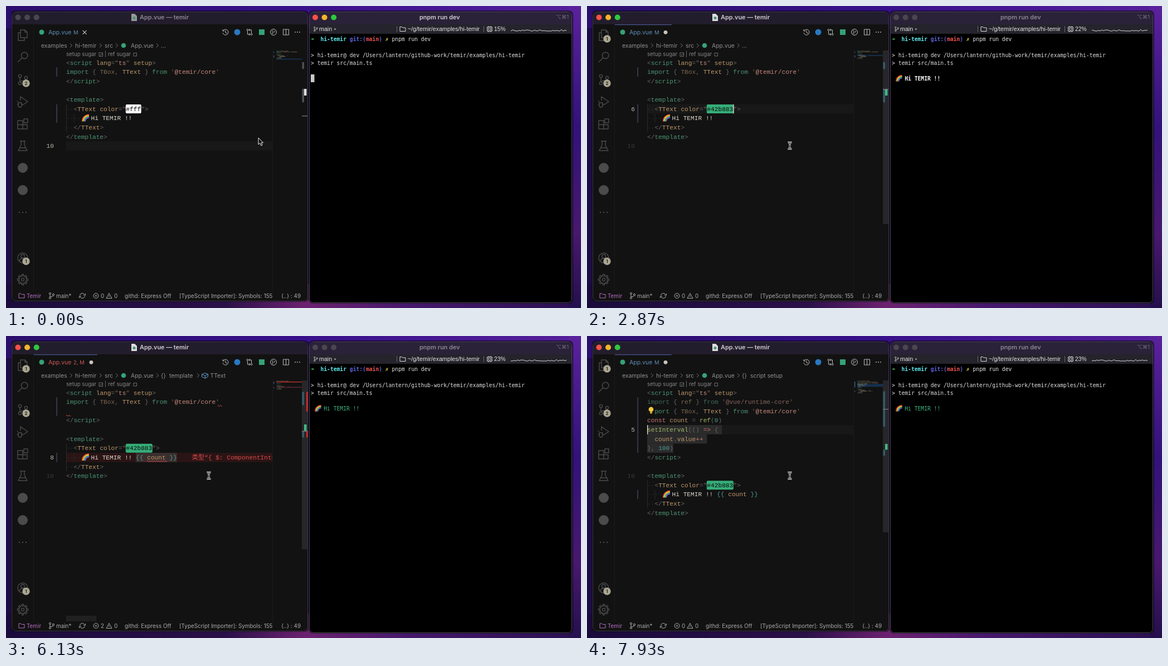
An HTML page for the animation above (8000 ms loop, 1032 px wide and 543 px high).

```html
<!DOCTYPE html>
<html lang="en">
<head>
<meta charset="utf-8">
<title>Editor and terminal</title>
<style>
html, body { margin: 0; width: 100%; height: 100%; overflow: hidden; background: #1d0d45; }
svg { display: block; width: 1032px; height: 543px; }
text { white-space: pre; }
.ui { font-family: Inter, sans-serif; }
.bar { font-family: "Liberation Sans", sans-serif; }
.code { font-family: "Liberation Mono", "Noto Sans CJK SC", "Noto Sans CJK", monospace; }
.term { font-family: "DejaVu Sans Mono", monospace; }
</style>
</head>
<body>
<svg viewBox="0 0 1032 543">
  <defs>
    <linearGradient id="top"><stop offset="0" stop-color="#2b0f6c"/><stop offset=".5" stop-color="#37108a"/><stop offset="1" stop-color="#55209a"/></linearGradient>
    <linearGradient id="low"><stop offset="0" stop-color="#1a0b3c"/><stop offset=".38" stop-color="#2a1048"/><stop offset=".52" stop-color="#6c2170"/><stop offset=".7" stop-color="#45186b"/><stop offset="1" stop-color="#291050"/></linearGradient>
    <linearGradient id="side" x2="0" y2="1"><stop offset="0" stop-color="#5a229c"/><stop offset=".4" stop-color="#32127a"/><stop offset=".75" stop-color="#48186f"/><stop offset="1" stop-color="#24104c"/></linearGradient>
    <clipPath id="edit"><rect x="50" y="79" width="429" height="434"/></clipPath>
  </defs>
  <g id="still"></g>
  <g id="live"></g>
</svg>
<script>
const CW = 6.709, LH = 16.62, X = 108, EMOJI = 2.64;
const LOOP = 8000;
const still = document.getElementById('still'), live = document.getElementById('live');
const INK = {
  p: '#666666', g: '#4d9375', y: '#bd976a', s: '#c98a7d', q: '#7d5d55', w: '#dbd7ca',
  u: '#7a6650', f: '#a1b567', r: '#cb7676', n: '#4c9a91', d: '#303030', k: '#0a0a0a', i: '#3f6b59', j: '#85635c'
};
const esc = s => s.replace(/&/g, '&amp;').replace(/</g, '&lt;');
const text = (x, y, s, fill, size, font = 'ui', more = '') =>
  `<text x="${x}" y="${y}" fill="${fill}" font-size="${size}" class="${font}" ${more}>${esc(s)}</text>`;
const rect = (x, y, w, h, fill, r = 0, more = '') =>
  `<rect x="${x}" y="${y}" width="${w}" height="${h}" rx="${r}" fill="${fill}" ${more}/>`;
const dot = (x, y, r, fill, more = '') => `<circle cx="${x}" cy="${y}" r="${r}" fill="${fill}" ${more}/>`;
const ring = (x, y, r, stroke, w = 1) => dot(x, y, r, 'none', `stroke="${stroke}" stroke-width="${w}"`);
const path = (d, stroke, w = 1, fill = 'none') =>
  `<path d="${d}" fill="${fill}" stroke="${stroke}" stroke-width="${w}" stroke-linejoin="round"/>`;
const at = (x, y, s) => `<g transform="translate(${x} ${y})">${s}</g>`;
const mid = n => 102 + (n - 1) * LH;

const rainbow = (x, y, size) => at(x, y, ['#e8453c', '#f59331', '#f7d83f', '#5fc25a', '#3f9be8', '#8a5bd0']
  .map((c, i) => {
    const r = size * (.95 - i * .09);
    return path(`M${size - r} ${size}A${r} ${r} 0 0 1 ${size} ${size - r}`, c, size * .1);
  }).join(''));
const badge = (y, n) => dot(36, y, 6.7, '#aaa692') + text(36, y + 3, n, '#15150f', 8, 'ui', 'text-anchor="middle" font-weight="600"');
const branch = (x, y, c, k = 1) => at(x, y, `<g transform="scale(${k})">` + ring(-3, -4, 1.6, c) + ring(-3, 4, 1.6, c) +
  ring(3, -2, 1.6, c) + path('M-3 -2.4V2.4M3 -.4C3 2 -3 1 -3 2.4', c) + '</g>');
const folder = (x, y, c) => path(`M${x} ${y}h3.5l1.5 1.5h5v6.5h-10z`, c);
const chevron = x => path(`M${x} 67.5l3.5 3.5l-3.5 3.5`, '#777');

function activityBar() {
  const c = '#4b4b4b', big = (x, y, d) => at(x, y, path(d, c, 1.4));
  const teeth = Array.from({length: 8}, (_, i) => `<path d="M-2 -6.5L-1.4 -9.5H1.4L2 -6.5" transform="rotate(${i * 45})" fill="none" stroke="${c}" stroke-width="1.3"/>`).join('');
  return big(30, 52, 'M-4 -9H4L8 -5V5H-4ZM-4 -4H-8V10H3V5M4 -9V-5H8') +
    big(30, 92, 'M9 -3A5.8 5.8 0 1 1 -2.6 -3A5.8 5.8 0 1 1 9 -3M-1 1L-9 9') +
    at(30, 132, ring(-5, -6, 2.6, c, 1.4) + ring(-5, 7, 2.6, c, 1.4) + ring(6, -3, 2.6, c, 1.4) + path('M-5 -3.4V4.4M6 -.4C6 4 -5 1 -5 4.4', c, 1.4)) +
    big(30, 172, 'M-4 -2V-9L9 0L0 6M-8 2H-2V7A3 3 0 0 1 -8 7ZM-8 0L-10 -1M-8 5H-10M-2 5H0') +
    big(30, 212, 'M-9 -6H0V9H-9ZM-9 1.5H8V9H0M2 -9H9V-2H2Z') +
    big(30, 252, 'M-5 -9H5M-3 -9V-2L-8 8H8L3 -2V-9M-5.5 3H5.5') +
    dot(30, 291, 9, c) + dot(30, 331, 9, c) +
    [-6, 0, 6].map(d => dot(30 + d, 371, 1.2, c)).join('') +
    at(30, 453, ring(0, 0, 9, c, 1.4) + ring(0, -3, 3.3, c, 1.4) + path('M-6 6C-5 -1 5 -1 6 6', c, 1.4)) +
    at(30, 492, ring(0, 0, 6.8, c, 1.3) + ring(0, 0, 2.5, c, 1.3) + teeth) +
    badge(139, '2') + badge(459, '1');
}

function toolbar() {
  const c = '#bbb';
  return at(394, 47, path('M-4 -3A5 5 0 1 1 -5 1M-5 -5V-2H-2M0 -3V1L3 2', c)) +
    dot(415, 47, 5.5, '#2878c0') +
    at(437, 47, ring(-3.5, -4, 1.5, c) + ring(3.5, 4, 1.5, c) + path('M-3.5 -2V4H1M-1 2L1 4L-1 6M3.5 2V-4H-1M1 -6L-1 -4L1 -2', c)) +
    rect(454, 42, 10, 10, '#35a276') +
    ring(480, 47, 5.5, c) + branch(480, 47, c, .6) +
    path('M497.5 42h10v10h-10zM502.5 42v10', c) +
    [-4, 0, 4].map(d => dot(523 + d, 47, .9, c)).join('');
}

function backdrop() {
  return rect(0, 0, 1032, 543, '#1d0d45') + rect(0, 0, 1032, 40, 'url(#top)') +
    rect(0, 500, 1032, 43, 'url(#low)') + rect(1010, 0, 22, 543, 'url(#side)') +
    rect(9, 8, 534, 524, '#000', 7, 'opacity=".55"') +
    rect(10.5, 10.5, 531, 520, '#121212', 7, 'stroke="#3d3846"') +
    path('M11 33V17Q11 11 17 11H535Q541 11 541 17V33Z', 'none', 0, '#221d2c') +
    path('M49.5 33V513M50 79.5', '#1b1b1b') +
    activityBar() + toolbar() + dot(64, 47, 4.5, '#35a276') +
    text(63, 75, 'examples', '#8f8f8f', 10.4) + chevron(115) + text(124, 75, 'hi-temir', '#8f8f8f', 10.4) + chevron(168) +
    text(177, 75, 'src', '#8f8f8f', 10.4) + chevron(197) + dot(211, 71, 4.3, '#35a276') + text(224, 75, 'App.vue', '#8f8f8f', 10.4) + chevron(270) +
    text(108, 90, 'setup sugar', '#858585', 9.7) + path('M167 84h6.5v6.5h-6.5zM168.5 87l1.7 1.8l2.6-3.5', '#858585', .8) +
    text(177, 90, '| ref sugar', '#858585', 9.7) + path('M229 84.5h5.5v5.5h-5.5z', '#858585', .8) +
    folder(23, 517, '#b56cc4') + text(37, 525, 'Temir', '#b56cc4', 9.9) +
    branch(82, 521, '#aaa') + text(90, 525, 'main*', '#aaa', 9.9) +
    at(137, 521, path('M-4.5 -.5A4.5 4.5 0 0 1 4 -2M4.5 .5A4.5 4.5 0 0 1 -4 2M2 -1H5.5V-4M-2 1H-5.5V4', '#aaa')) +
    ring(161.5, 521, 4.5, '#aaa') + path('M159.7 519.2l3.6 3.6m0-3.6l-3.6 3.6M185 516.5l5 9h-10zM185 520v3', '#aaa') +
    text(194, 525, '0', '#aaa', 9.9) + text(213, 525, 'githd: Express Off', '#aaa', 9.9) +
    text(311, 525, '[TypeScript Importer]: Symbols: 155', '#aaa', 9.9) + text(494, 525, '{..} : 49', '#aaa', 9.9) +
    rect(543, 8, 475, 527, '#000', 8, 'opacity=".55"') +
    rect(544.5, 10.5, 471, 523, '#000', 7, 'stroke="#4a4653"') +
    path('M545 33V17Q545 11 551 11H1009Q1015 11 1015 17V33Z', 'none', 0, '#2a2238') +
    rect(545, 33, 470, 17, '#25232b') + path('M701.5 36V47M857.5 36V47', '#68656f') +
    text(987, 22.5, '⌥⌘1', '#756d80', 9.5) + branch(556, 41.5, '#ddd', .75) +
    text(562, 45.3, 'main', '#e4e4e4', 10.7, 'bar') + dot(590.5, 41.5, 1.5, '#999') +
    folder(707, 37.5, '#ddd') + text(721, 45.3, '~/g/temir/examples/hi-temir', '#e4e4e4', 10.7, 'bar') +
    path('M864 37.5h8v8h-8zM866 39.5h4v4h-4zM866 36v1.5m4-1.5v1.5m-4 8v1.5m4-1.5v1.5M862.5 39.5h1.5m-1.5 4h1.5m8-4h1.5m-1.5 4h1.5', '#ddd', .9) +
    [[0, '➜', '#3fd85c'], [3, 'hi-temir', '#5fe8ec'], [12, 'git:(', '#5b63dc'], [17, 'main', '#ef5350'], [21, ')', '#5b63dc'], [23, '✗', '#f1e84a']]
      .map(([c, s, ink]) => text(547 + c * 5.82, 63.3, s, ink, 9.67, 'term', 'font-weight="700"')).join('') +
    text(692.5, 63.3, 'pnpm run dev', '#e6e6e6', 9.67, 'term') +
    text(547, 91.5, '> hi-temir@ dev /Users/lantern/github-work/temir/examples/hi-temir', '#e0e0e0', 9.67, 'term') +
    text(547, 105.7, '> temir src/main.ts', '#e0e0e0', 9.67, 'term');
}

// Source lines: tokens split by "~", the first letter picks the ink.
const IMPORT = 'gimport~p { ~uTBox~p, ~yTText~p } ~gfrom~p ~q\'~s@temir/core~q\'';
const IMPORT_REF = 'iimport~p { ~uref~p } ~ifrom~p ~q\'~j@vue/runtime-core~q\'';
const CONST = 'rconst~p ~ycount~p = ~fref~p(~n0~p)';
const TIMER = ['fsetInterval~p(() ~r=>~p {', 'd··~ycount~p.~yvalue~r++', 'p}, ~n100~p)'];
const COUNT = 'p ~n{{~p ~ycount~p ~n}}';

const tokens = s => s ? s.split('~') : [];
const size = s => tokens(s).reduce((n, k) => n + (k[0] == 'e' ? EMOJI : k.length - 1), 0);
const cut = (s, n) => tokens(s).map(k => {
  const part = k.slice(0, 1 + Math.max(0, n));
  n -= k.length - 1;
  return part;
}).filter(k => k.length > 1).join('~');
const typed = (t, from, step) => t < from ? 0 : Math.floor((t - from) / step) + 1;
const latest = (t, list) => list.filter(k => k[0] <= t).pop();

function document_(t) {
  const hex = t < 2100 ? 'fff'.slice(0, 3 - Math.min(3, typed(t, 1800, 100))) : '42b883'.slice(0, typed(t, 2100, 120));
  const valid = hex.length == 3 || hex.length == 6;
  const rows = [['p<~gscript~p ~ylang~p=~q"~sts~q"~p ~ysetup~p>', 0]];
  let caret;
  if (t >= 6652) rows.push([IMPORT_REF, 1]);
  rows.push([IMPORT, 1]);
  if (t >= 6300) rows.push([cut(CONST, typed(t, 6300, 22)), 1]);
  if (t >= 6900) {
    let left = typed(t, 6900, 12);
    for (const s of TIMER) {
      if (left < 0) break;
      rows.push([cut(s, left), 1]);
      caret = [rows.length, Math.min(left, size(s))];
      left -= size(s) + 1;
    }
  } else if (t >= 4750) rows.push(['', 1]);
  rows.push(['p</~gscript~p>', 0], ['', 0], ['p<~gtemplate~p>', 0]);
  const tag = rows.push([`d··~p<~yTText~p ~ycolor~p=~q"~${valid ? 'k' : 's'}#${hex}~q"~p>`, t < 3200]);
  const greet = cut(COUNT, typed(t, 5000, 50));
  rows.push(['d····~e~wHi TEMIR !!' + (greet && '~' + greet), 1], ['d··~p</~yTText~p>', 0], ['p</~gtemplate~p>', 0], ['', 0]);

  let last = latest(t, [[730], [1200], [1300], [1400], [1500], [1650], [1800], [2700], [4500], [4750], [5550], [6300], [6718], [6850], [7430], [7600], [7700], [7800]]) || [0];
  if (t < 1200) caret = [10, 0];
  else if (t < 1650) caret = [10 - typed(Math.min(t, 1500), 1200, 100), 0];
  else if (t < 4500) caret = [6, 17 + hex.length];
  else if (t < 4750) caret = [6 - Math.min(4, typed(t, 4500, 50)), 0];
  else if (t < 5000) caret = [3 + Math.min(5, typed(t, 4800, 40)), 0];
  else if (t < 6150) caret = [8, 4 + EMOJI + 11 + Math.min(12, typed(t, 5000, 50))];
  else if (t < 6300) caret = [8 - Math.min(5, typed(t, 6150, 30)), 0];
  else if (t < 6850) caret = [t < 6652 ? 3 : 4, Math.min(20, typed(t, 6300, 22))];
  else if (t < 6900) caret = [5, 0];
  else if (t >= 7600) caret = [7 - Math.min(2, typed(t, 7700, 100)), 0];
  return {rows, caret, tag, hex, valid, blink: t >= 730 && (t - last[0]) % 1000 < 500};
}

const squiggle = (x, y, w) => {
  let d = `M${x} ${y}`;
  for (let i = 0; i < w; i += 4) d += 'q1 -2.6 2 0t2 0';
  return path(d, '#d84a4a', .9);
};

function editor(t) {
  const {rows, caret, tag, hex, valid, blink} = document_(t);
  const [row, col] = caret, focus = t >= 730;
  const error = t >= 5700 && t < 7000, moved = t >= 6300;
  const errorRow = moved ? tag : tag + 1;
  const step = 420 / (rows.length + 25), mark = n => 89 + (n - 1) * step;
  const swatch = '#' + hex;
  const tint = '#' + (hex.length == 6 ? '35ad78' : 'ffffff');
  const endX = n => X + (size(rows[n - 1][0]) + 4) * CW;
  const top = n => mid(n) - LH / 2;
  let s = rect(X, top(row), 371, LH, '#181818'), map = '', ruler = '';

  if (error) s += rect(X, top(errorRow), 371, LH, '#2b1415');
  if (t >= 7600) for (let n = row; n < 8; n++) s += rect(X, top(n), (size(rows[n - 1][0]) + (n < 7)) * CW, LH, '#2b2b2b');
  if (error && !moved) s += rect(X + (size(rows[7][0]) - 11) * CW, top(8), 11 * CW, LH, '#3a2e2e');
  if (valid) s += rect(X + 16 * CW - .5, top(tag) + .3, (hex.length + 1) * CW + 1, LH - .6, tint, 2);

  map += rect(485, 79 + row * 1.64 - .8, 46, 1.8, '#16304f');
  if (t >= 7600) map += rect(485, 79 + row * 1.64 - .8, 46, (8 - row) * 1.64, '#16304f');
  rows.forEach(([line, changed], i) => {
    const n = i + 1;
    let c = 0;
    for (const k of tokens(line)) {
      if (k[0] == 'e') { s += rainbow(X + c * CW + 1, top(n) + 1, 13); c += EMOJI; continue; }
      const str = k.slice(1);
      s += text(X + c * CW, mid(n) + 3.6, str, INK[k[0]], 11.18, 'code');
      if (k[0] != 'd' && str.trim()) map += rect(485 + c * .93, 79 + n * 1.64, str.length * .93, .8, INK[k[0]], 0, 'opacity=".65"');
      c += str.length;
    }
    if (changed) {
      s += rect(90.5, top(n), 1.3, LH, '#4c4866');
      map += rect(480, 79 + n * 1.64, 1.3, 1.64, '#4568a8');
      ruler += rect(531.5, mark(n), 3.5, step + .2, focus ? '#365b68' : '#4c5255');
    }
  });
  s += rect(X, top(tag), 1, LH * 3, '#292929') + rect(X + 2 * CW, top(tag + 1), 1, LH, '#292929');
  for (const n of new Set([10, row])) if (n <= rows.length)
    s += text(86, mid(n) + 3.6, String(n), n == row ? '#b8b5aa' : '#393939', 11.18, 'code', 'text-anchor="end"');

  if (t >= 3700 && t < 4500) s += text(endX(6), mid(6) + 3.6, 'nightowlqz [19 hours ago]', '#777', 11.18, 'code', 'font-style="italic"');
  if (error) {
    s += text(endX(errorRow), mid(errorRow) + 3.6, '类型“{ $: ComponentInternalInstance', '#dd4b4b', 11.18, 'code');
    const blank = tag - 4;
    s += squiggle(X, mid(blank) + 8, 6);
    if (moved) s += squiggle(X + 23 * CW, mid(tag) + 7, 12);
    else s += squiggle(X + 40.5 * CW, mid(2) + 7, 6) + squiggle(X + (size(rows[7][0]) - 8) * CW, mid(8) + 7, 33);
    ruler += rect(539, mark(blank - 1), 3, step * 3, '#c52d2d') + rect(539, mark(errorRow), 3, step, '#c52d2d');
    map += rect(485, 79 + (blank - 1) * 1.64 - .4, 46, 1.5, '#b82b2b') + rect(485, 79 + errorRow * 1.64 - .4, 46, 1.3, '#632020');
  }
  if (t >= 6718 && t < 6850) {
    s += [17, 19].map(c => rect(X + c * CW, top(row) + 1, CW, LH - 2, 'none', 0, 'stroke="#777" stroke-width=".8"')).join('');
    ruler += rect(535, mark(row), 6, step, '#999');
  }
  if (blink) s += rect(X + col * CW, top(row), 1.3, LH, '#e8e5da');
  if (t >= 7850) s += rect(X + 1.6, top(3), 12, LH, '#121212') + dot(115, 132, 4.4, '#f5c542') + rect(113, 135.5, 4, 4, '#d9a52e', 1);

  const wide = t >= 3700 && t < 4500 ? 261 : error ? 54 : 0;
  const slider = focus ? rect(531, 80, 10, 26 * step, '#272729') : '';
  if (valid) ruler += rect(535, mark(tag), 4.5, step, hex.length == 6 ? swatch : focus ? '#fff' : '#ddd');
  return `<g clip-path="url(#edit)">${s}${wide ? rect(X, 503, wide, 10, '#202020') : ''}</g>` +
    path('M478.5 79V513M531 79.5', '#1b1b1b') + map + slider + ruler + rect(531, mark(row), 10, 1.3, '#777');
}

function chrome(t) {
  const focus = t >= 730, error = t >= 5700 && t < 7000;
  const dirty = t >= 1800 && t < 3100 || t >= 4750;
  const lights = (x, on) => ['#ff4f4a', '#f6b42c', '#2fc840'].map((c, i) => dot(x + i * 16.6, 20.5, 5, on ? c : '#4a4650')).join('');
  const title = (x, s, on) => text(x, 24.3, s, on ? '#d0ccd4' : '#8d8695', 10.9, 'ui', 'font-weight="600"');
  const closeX = error ? 153 : 141, ink = error ? '#cf5757' : '#5f8fb8';
  let s = lights(21.5, focus) + title(240, 'App.vue — temir', focus) + lights(555, !focus) + title(742, 'pnpm run dev', !focus) +
    path('M225 14h6l4 4v9h-10z', 'none', 0, focus ? '#ddd' : '#999') + dot(230, 21.5, 2.6, '#4c9478') +
    text(76, 51, 'App.vue', ink, 10.5) + text(121, 51, error ? '2, M' : 'M', ink, 9.5) + text(170, 525, error ? '2' : '0', '#aaa', 9.9);
  s += dirty ? dot(closeX, 47.3, 3.4, '#c8c5bb') + rect(50, 33, closeX + 11 - 50, 1.2, '#4d5590') + badge(59, '1')
    : path(`M${closeX - 3.5} 43.8l7 7m0-7l-7 7`, '#ccc', 1.1);

  const inScript = t >= 6600;
  if (t < 3300) s += text(278, 75, '...', '#8f8f8f', 10.4);
  else {
    s += text(278, 75, '{}', '#8f8f8f', 10.4) + text(293, 75, inScript ? 'script setup' : 'template', '#8f8f8f', 10.4);
    if (!inScript) s += chevron(343) + path('M351.5 69l5-2.5l6 2v4.5l-5 3l-6-2.5zM351.5 69l6 2.5l5-3M357.5 71.5v4.5', '#5a9fd0') + text(366.5, 75, 'TText', '#8f8f8f', 10.4);
  }
  return s;
}

function terminal(t) {
  const cpu = latest(t, [[0, 15], [800, 26], [2400, 22], [4000, 24], [5500, 23], [6500, 22], [7300, 23]])[1];
  const shift = Math.floor(t / 1600);
  const graph = Array.from({length: 34}, (_, i) => {
    const n = Math.sin((i + shift) * 12.99) * 43758.5;
    return `${906 + i * 3.03},${(45 - 2.7 * (n - Math.floor(n)) ** 2).toFixed(1)}`;
  }).join(' ');
  let s = text(876, 45.3, cpu + '%', '#e4e4e4', 10.4, 'bar') + `<polyline points="${graph}" fill="none" stroke="#ddd"/>`;
  if (t >= 1500) {
    const green = t >= 3350;
    s += rainbow(554, 124, 11.5) + text(570.3, 133.8, 'Hi TEMIR !!', green ? '#42b883' : '#fff', 9.67, 'term', green ? '' : 'font-weight="700"');
  } else s += t < 730 ? rect(547, 123, 6.5, 14, '#c9c9c9') : rect(547.5, 123.5, 5.5, 13, 'none', 0, 'stroke="#aaa"');
  return s;
}

function pointer(t) {
  const p = Math.min(1, Math.max(0, (t - 330) / 350)), e = p * p * (3 - 2 * p);
  if (p < 1) return at(453 - 89 * e, 237 + 14 * e, path('M0 0V12L2.8 9.5L4.8 14L7 13L5 8.8H8.6Z', '#eee', 1, '#111'));
  const beam = 'M-3.5 -6Q0 -6 0 -4Q0 -6 3.5 -6M0 -4V4M-3.5 6Q0 6 0 4Q0 6 3.5 6M-1.5 1H1.5';
  return at(364, 251, path(beam, '#eee', 3) + path(beam, '#111', 1));
}

still.innerHTML = backdrop();
let shown = '';
function frame() {
  const t = performance.now() % LOOP;
  const next = chrome(t) + editor(t) + terminal(t) + pointer(t);
  if (next !== shown) live.innerHTML = shown = next;
  requestAnimationFrame(frame);
}
frame();
</script>
</body>
</html>
```
